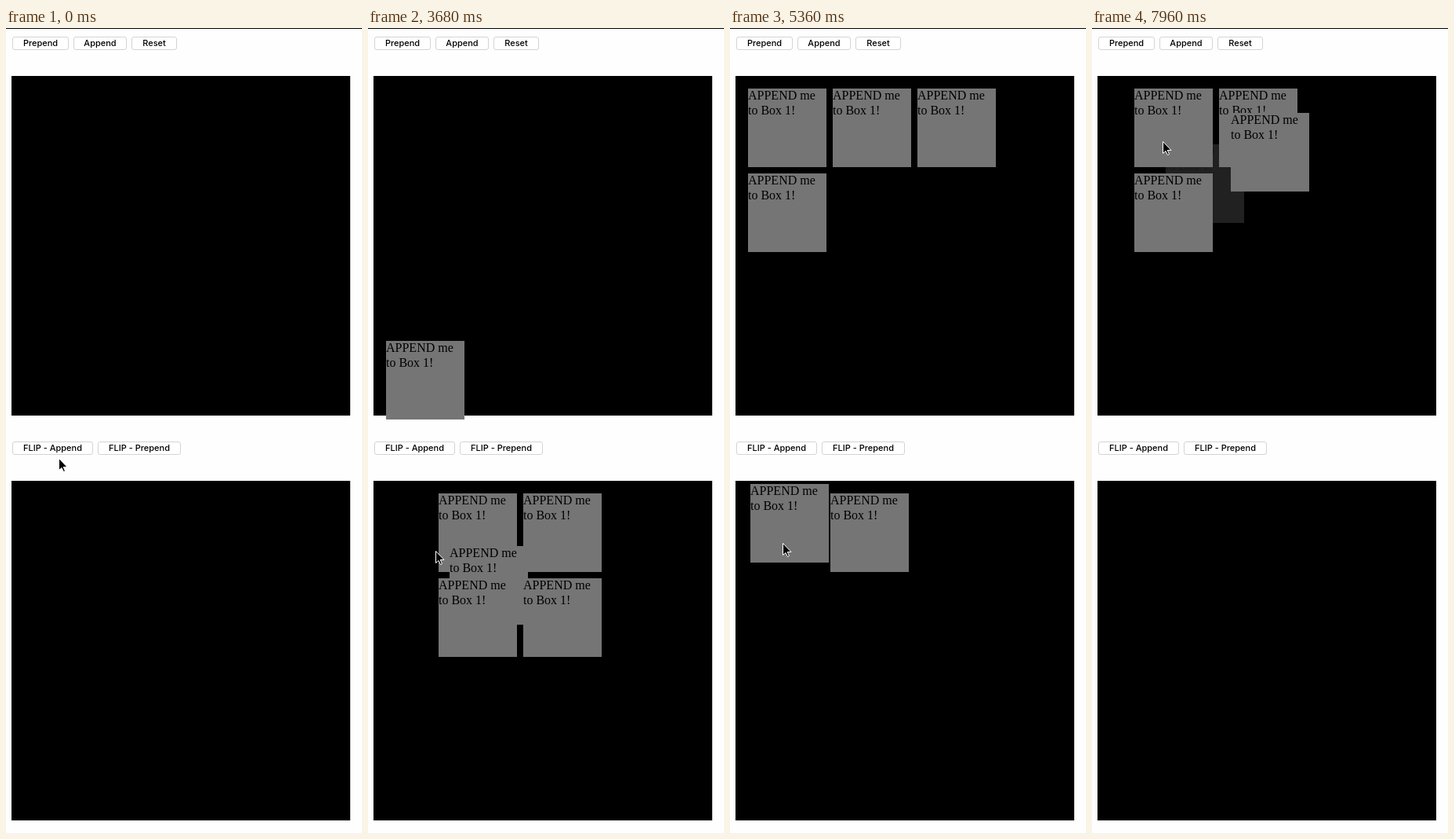
An HTML page with a canvas that plays this animation: 454x1024 px, repeating every 8 s.

```html
<!DOCTYPE html>
<html lang="en">
<head>
<meta charset="utf-8">
<style>
  html, body { margin: 0; height: 100%; overflow: hidden; background: #fefefe; }
  canvas { display: block; }
</style>
</head>
<body>
<canvas id="stage" width="454" height="1024"></canvas>
<script>
const ctx = document.getElementById('stage').getContext('2d');
const LOOP = 8000, STEP = 40, MOVE = 380, COUNT = 6;
const TOP_BOX = 61, LOW_BOX = 576;

// Clicks: six appends, six moves to the upper box, then removals.
const clicks = [
  700, 1070, 1500, 1840, 2330, 2720,
  3515, 3965, 4415, 4860, 5313, 5766.5,
  7316, 7724
];

// Pointer path: time, x, y
const pointer = [
  [0, 67, 547], [120, 67, 537], [2950, 67, 537], [3350, 86, 665],
  [3720, 86, 665], [3920, 68, 655], [6500, 67, 655],
  [7120, 91, 147], [7700, 91, 147], [7800, 90, 144], [LOOP, 90, 144]
];

const buttons = [
  ['Prepend', 8, 11, 72], ['Append', 86, 11, 68], ['Reset', 160, 11, 58],
  ['FLIP - Append', 8, 526, 103], ['FLIP - Prepend', 117, 526, 106]
];

const clamp = (v, lo, hi) => Math.min(hi, Math.max(lo, v));
const mix = (a, b, p) => a + (b - a) * p;
const easeInOut = p => p < .5 ? 2 * p * p : 1 - 2 * (1 - p) ** 2;

const slot = (n, boxTop) => [23 + n % 3 * 108, boxTop + 16 + Math.floor(n / 3) * 108, 1];

// Where an item rests ([x, y, opacity]) once a number of clicks are done.
function place(item, done) {
  const moved = clamp(done - COUNT, 0, COUNT);
  const gone = clamp(done - 2 * COUNT, 0, COUNT);
  if (item >= Math.min(done, COUNT)) {
    const [x, y] = slot(item, LOW_BOX);
    return [x - 100, y + 50, 0];
  }
  if (item >= moved) return slot(item - moved, LOW_BOX);
  if (item >= gone) return slot(item - gone, TOP_BOX);
  return [123, 177, 0];
}

function pointerAt(t) {
  const i = pointer.findIndex(k => k[0] > t);
  const [t0, x0, y0] = pointer[i - 1], [t1, x1, y1] = pointer[i];
  const p = easeInOut((t - t0) / (t1 - t0));
  return [Math.round(mix(x0, x1, p)), Math.round(mix(y0, y1, p))];
}

function drawButton([label, x, y, w]) {
  ctx.beginPath();
  ctx.roundRect(x + .5, y + .5, w - 1, 16, 2.5);
  ctx.fillStyle = '#fff';
  ctx.fill();
  ctx.strokeStyle = '#d4d4d4';
  ctx.lineWidth = 1;
  ctx.stroke();
  ctx.fillStyle = '#000';
  ctx.font = '500 11px Inter, sans-serif';
  ctx.textAlign = 'center';
  ctx.fillText(label, x + w / 2, y + 12);
}

function drawItem([left, top, opacity]) {
  if (opacity <= 0) return;
  const x = Math.round(left), y = Math.round(top);
  ctx.globalAlpha = opacity;
  ctx.fillStyle = '#757575';
  ctx.fillRect(x, y, 100, 100);
  ctx.fillStyle = '#000';
  ctx.font = '16px "Liberation Serif", serif';
  ctx.textAlign = 'left';
  ctx.fillText('APPEND me', x, y + 14);
  ctx.fillText('to Box 1!', x, y + 33);
  ctx.globalAlpha = 1;
}

function drawRing(x, y) {
  ctx.beginPath();
  ctx.arc(x, y, 20, 0, 7);
  for (const [color, width] of [['#fff', 5], ['#000', 3]]) {
    ctx.strokeStyle = color;
    ctx.lineWidth = width;
    ctx.stroke();
  }
}

const arrow = new Path2D('M.5 .5V15.5L4 12.5L6.5 17.5L8.5 16.5L6.2 11.5H11Z');

function drawPointer(x, y) {
  ctx.save();
  ctx.translate(x, y);
  ctx.fillStyle = '#000';
  ctx.fill(arrow);
  ctx.strokeStyle = '#fff';
  ctx.lineWidth = 1;
  ctx.stroke(arrow);
  ctx.restore();
}

function draw(t) {
  ctx.fillStyle = '#fefefe';
  ctx.fillRect(0, 0, 454, 1024);
  ctx.fillStyle = '#000';
  ctx.fillRect(0, 0, 454, 1);
  for (const y of [TOP_BOX, LOW_BOX]) ctx.fillRect(7, y, 432, 432);
  buttons.forEach(drawButton);

  const done = clicks.filter(c => c <= t).length;
  if (done) {
    const p = easeInOut(clamp((t - clicks[done - 1]) / MOVE, 0, 1));
    for (let i = 0; i < COUNT; i++) {
      const to = place(i, done);
      drawItem(place(i, done - 1).map((v, k) => mix(v, to[k], p)));
    }
  }

  const [x, y] = pointerAt(t);
  if (clicks.some(c => t >= c - 60 && t < c + 40)) drawRing(x + 1, y + 1);
  drawPointer(x, y);
}

const start = performance.now();
function tick() {
  const t = (performance.now() - start) % LOOP;
  draw(Math.floor(t / STEP) * STEP);
  requestAnimationFrame(tick);
}
tick();
</script>
</body>
</html>
```
